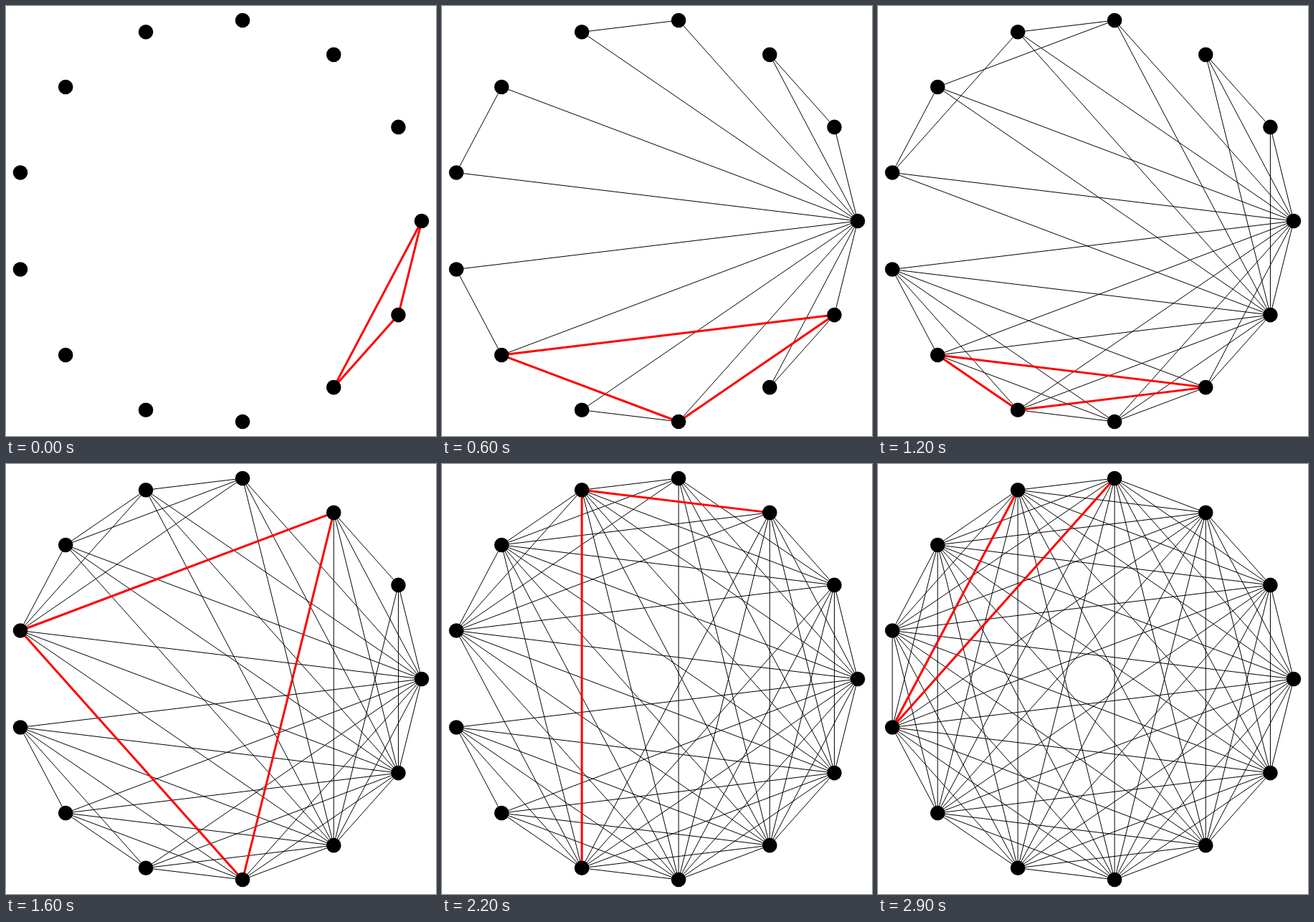
These frames come from a looping animation (600x600 px, 3 s). An HTML page with a canvas:

```html
<!DOCTYPE html>
<html lang="en">
<head>
<meta charset="utf-8">
<title>Covering a complete graph with triangles</title>
<style>
  html, body { margin: 0; width: 100%; height: 100%; overflow: hidden; background: #fff; }
  canvas { display: block; width: 100vw; height: 100vh; }
</style>
</head>
<body>
<canvas id="stage" width="600" height="600"></canvas>
<script>
const ctx = document.getElementById('stage').getContext('2d');
const COUNT = 13, STEP_MS = 100, MARGIN = 20, SIZE = 600, DOT_RADIUS = 10.3;

// The unit circle's points, stretched so that their bounding box fills the stage.
const turn = 2 * Math.PI / COUNT;
const circle = Array.from({ length: COUNT }, (_, k) => [Math.cos(k * turn), Math.sin(k * turn)]);
const fit = axis => {
  const values = circle.map(p => p[axis]);
  const low = Math.min(...values), high = Math.max(...values);
  return v => MARGIN + (v - low) / (high - low) * (SIZE - 2 * MARGIN);
};
const fitX = fit(0), fitY = fit(1);
const points = circle.map(([x, y]) => [fitX(x), fitY(y)]);

// Greedy cover: for each uncovered edge take the first wholly new triangle,
// otherwise the last one that still adds two edges.
function coverEdges() {
  const covered = new Set();
  const key = ([a, b]) => a * COUNT + b;
  const steps = [];
  for (let a = 0; a < COUNT; a++) {
    for (let b = a + 1; b < COUNT; b++) {
      if (covered.has(key([a, b]))) continue;
      let best = [];
      for (let c = b + 1; c < COUNT && best.length < 3; c++) {
        const fresh = [[a, b], [a, c], [b, c]].filter(e => !covered.has(key(e)));
        if (fresh.length >= 2) best = fresh;
      }
      best.forEach(e => covered.add(key(e)));
      steps.push(best);
    }
  }
  return steps;
}
const steps = coverEdges();

function strokeEdges(edges, color, width) {
  ctx.strokeStyle = color;
  ctx.lineWidth = width;
  for (const [a, b] of edges) {
    ctx.beginPath();
    ctx.moveTo(...points[a]);
    ctx.lineTo(...points[b]);
    ctx.stroke();
  }
}

function draw(index) {
  ctx.fillStyle = '#fff';
  ctx.fillRect(0, 0, SIZE, SIZE);
  strokeEdges(steps.slice(0, index).flat(), '#000', 1);
  strokeEdges(steps[index], '#f00', 3);
  ctx.fillStyle = '#000';
  for (const [x, y] of points) {
    ctx.beginPath();
    ctx.arc(x, y, DOT_RADIUS, 0, 2 * Math.PI);
    ctx.fill();
  }
}

const start = performance.now();
function tick() {
  const elapsed = performance.now() - start;
  draw(Math.floor(elapsed / STEP_MS) % steps.length);
  requestAnimationFrame(tick);
}
tick();
</script>
</body>
</html>
```
